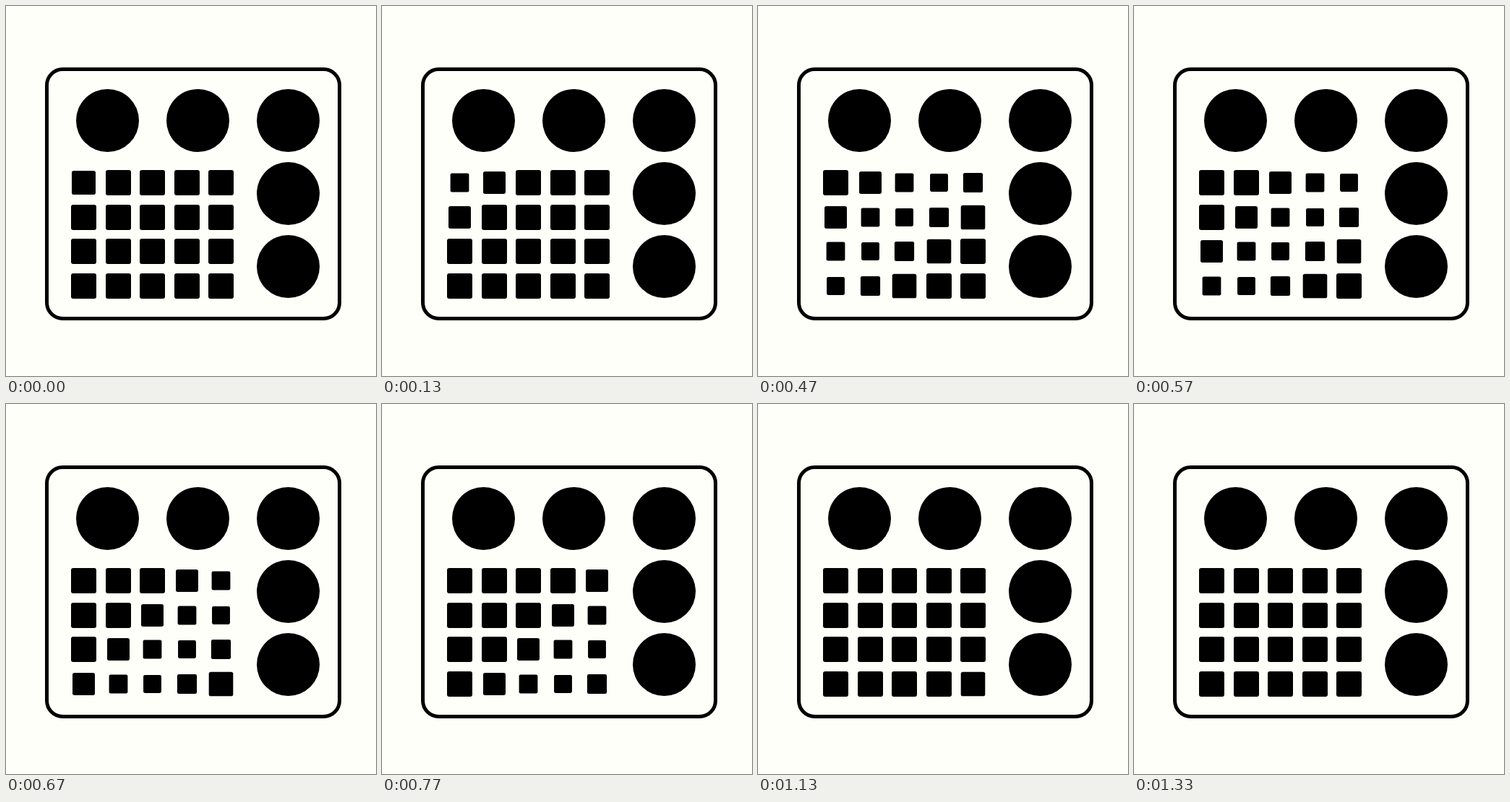
An HTML page that plays this animation: 512 px wide and 512 px high, repeating every 1.39 s.

```html
<!DOCTYPE html>
<html lang="en">
<head>
<meta charset="utf-8">
<title>Button panel</title>
<style>
  html, body { margin: 0; width: 100%; height: 100%; overflow: hidden; background: #fffffa; }
  svg { display: block; width: 100%; height: 100%; }
</style>
</head>
<body>
<svg id="stage" viewBox="0 0 512 512">
  <rect x="56.5" y="87.5" width="405" height="345" rx="22" fill="none" stroke="#000" stroke-width="5"/>
  <circle cx="140.5" cy="158.5" r="43.5"/>
  <circle cx="265.5" cy="158.5" r="43.5"/>
  <circle cx="390.5" cy="158.5" r="43.5"/>
  <circle cx="390.5" cy="259.5" r="43.5"/>
  <circle cx="390.5" cy="360.5" r="43.5"/>
</svg>
<script>
  const LOOP = 1390, COLS = 5, ROWS = 4, PITCH = 47.5, FULL = 35;
  const LAST_STEP = 40, DELAY = 3, MIDDLE = 6;
  // Key size by distance, in steps, from the middle of its dip
  const SIZES = [24.6, 24.9, 25.8, 26.4, 27.2, 31, 33, 33.6, FULL];

  const stage = document.getElementById('stage');
  const keys = [];

  for (let row = 0; row < ROWS; row++) {
    for (let col = 0; col < COLS; col++) {
      const el = document.createElementNS('http://www.w3.org/2000/svg', 'rect');
      stage.appendChild(el);
      keys.push({
        el,
        x: 107.5 + Math.round(col * PITCH),
        y: 244.5 + Math.round(row * PITCH),
        diagonal: row + col
      });
    }
  }

  // Thirty steps a second, each starting on a multiple of 10 ms
  function stepAt(ms) {
    const tick = Math.floor(ms / 10) * 10;
    return Math.min(LAST_STEP, Math.floor((tick + 3.4) * 0.03));
  }

  function sizeAt(step, diagonal) {
    const distance = Math.abs(step - DELAY * diagonal - MIDDLE);
    return SIZES[Math.min(distance, SIZES.length - 1)];
  }

  function draw(ms) {
    const step = stepAt(ms % LOOP);
    for (const { el, x, y, diagonal } of keys) {
      const size = sizeAt(step, diagonal);
      el.setAttribute('x', x - size / 2);
      el.setAttribute('y', y - size / 2);
      el.setAttribute('width', size);
      el.setAttribute('height', size);
      el.setAttribute('rx', 3 * size / FULL);
    }
  }

  const start = performance.now();
  function tick() {
    draw(performance.now() - start);
    requestAnimationFrame(tick);
  }
  tick();
</script>
</body>
</html>
```
